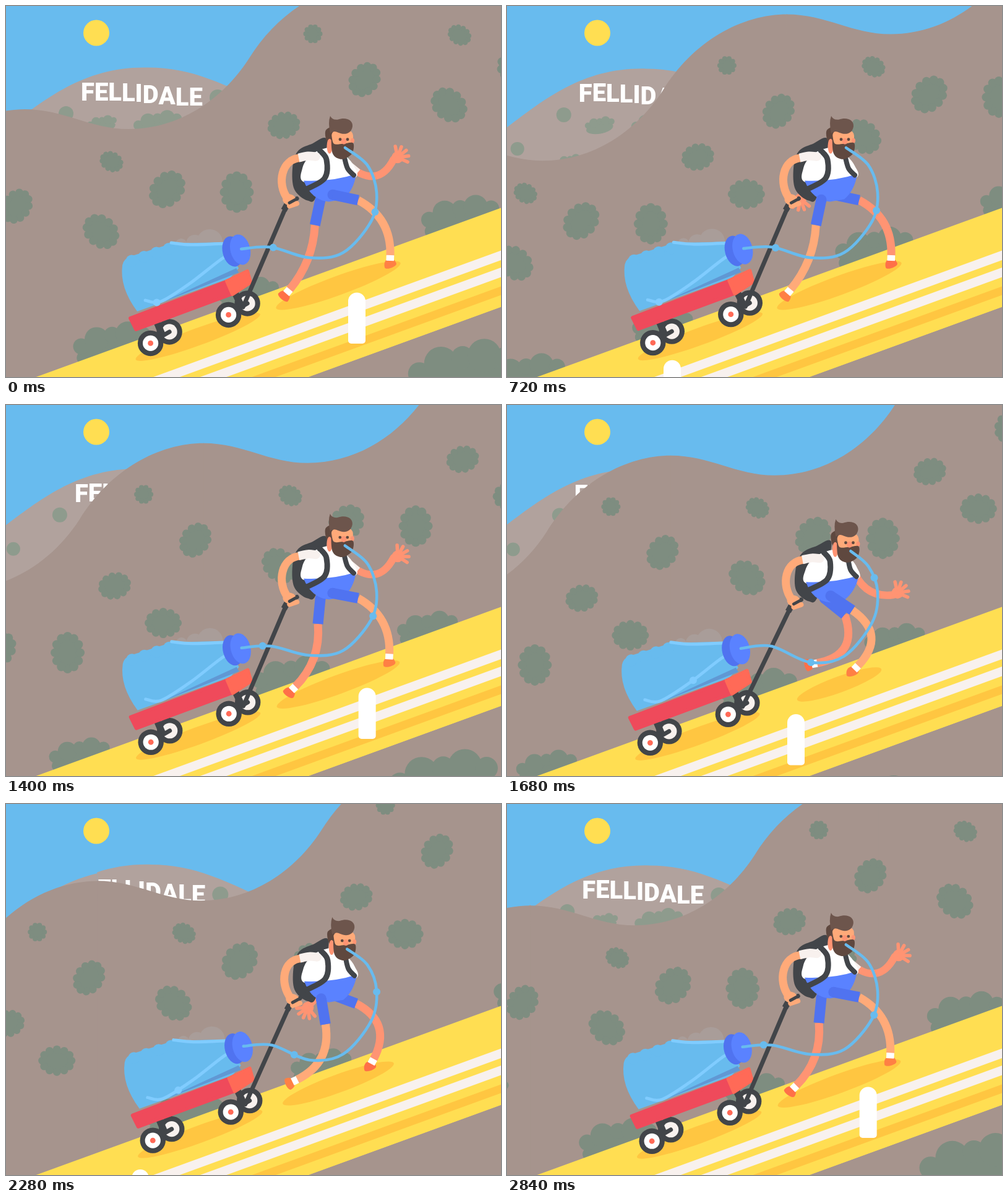
Recreate the animation shown at these times as an HTML page with a canvas. Size 800 px wide and 600 px high, loop 2.88 s.

```html
<!DOCTYPE html>
<html lang="en">
<head>
<meta charset="utf-8">
<title>Uphill hike</title>
<style>
html, body { margin: 0; width: 100%; height: 100%; overflow: hidden; background: #a6948d; }
canvas { display: block; }
</style>
</head>
<body>
<canvas id="stage" width="800" height="600"></canvas>
<script>
const c = document.getElementById('stage').getContext('2d');
const LOOP = 2880, CYCLE = 1440, STEP = 720, FRAME = 40;
const TAN = Math.tan(Math.PI / 9), TAU = Math.PI * 2, DEG = Math.PI / 180;
const HILL = 562.5, ROAD = 600, FAR = 20.8;

const col = {
  sky: '#68bbee', sun: '#ffde52', hill: '#a6948d', far: '#b1a29d', bush: '#7e8d80', farBush: '#8e9b8d',
  shade: '#ffc641', line: '#f8f1ee', dark: '#424549', red: '#ef4a5b', coral: '#ff6a57',
  blue: '#5a82ff', navy: '#5073f0', pale: '#80ccff', skin: '#ffaa79', skin2: '#ff9473',
  hair: '#6d554c', beard: '#5f483f'
};

const mix = (a, b, u) => a + (b - a) * u;
const ease = u => u * u * (3 - 2 * u);
const clamp = u => Math.max(0, Math.min(1, u));
// Cosine wave that peaks at the given time.
const wave = (t, period, peak) => Math.cos((t - peak) / period * TAU);

function spline(pts, closed) {
  const n = pts.length, g = i => closed ? pts[(i + n) % n] : pts[Math.max(0, Math.min(n - 1, i))];
  c.moveTo(...pts[0]);
  for (let i = 0; i < (closed ? n : n - 1); i++) {
    const [p, a, b, q] = [g(i - 1), g(i), g(i + 1), g(i + 2)];
    c.bezierCurveTo(a[0] + (b[0] - p[0]) / 6, a[1] + (b[1] - p[1]) / 6,
      b[0] - (q[0] - a[0]) / 6, b[1] - (q[1] - a[1]) / 6, ...b);
  }
}
function paint(fill) { c.fillStyle = fill; c.fill(); }
function blob(pts, fill) { c.beginPath(); spline(pts, true); paint(fill); }
function poly(pts, fill) { c.beginPath(); pts.forEach(p => c.lineTo(...p)); c.closePath(); paint(fill); }
function ink(color, width, cap = 'round') {
  c.strokeStyle = color; c.lineWidth = width; c.lineCap = cap; c.lineJoin = 'round'; c.stroke();
}
function curve(pts, color, width, cap) { c.beginPath(); spline(pts); ink(color, width, cap); }
function seg(x1, y1, x2, y2, color, width, cap) {
  c.beginPath(); c.moveTo(x1, y1); c.lineTo(x2, y2); ink(color, width, cap);
}
function oval(x, y, rx, ry, rot, fill) { c.beginPath(); c.ellipse(x, y, rx, ry, rot, 0, TAU); paint(fill); }
function disc(x, y, r, fill) { oval(x, y, r, r, 0, fill); }
function shifted(x, y, draw) { c.save(); c.translate(x, y); draw(); c.restore(); }
function uphill(m, draw) { shifted(m, -m * TAN, draw); }

// ---- landscape ----
function shrub(x, y, rx, rot) {
  const round = rx < 18, ry = round ? rx : rx * .82, n = round ? 10 : 12, r = ry * .26;
  c.save(); c.translate(x, y); c.rotate(rot);
  oval(0, 0, rx - r * .7, ry - r * .7, 0, col.bush);
  for (let i = 0; i < n; i++) {
    const a = i / n * TAU;
    disc((rx - r) * Math.cos(a), (ry - r) * Math.sin(a), r, col.bush);
  }
  c.restore();
}

// A rounded row of leaves that leans with the slope.
function hedge(x, y, w, fill) {
  oval(x, y + w * .12, w * .58, w * .24, -.18, fill);
  for (let i = 0; i < 5; i++) {
    const dx = w * (i / 4 - .5), lift = w * .17 * Math.sin(Math.PI * (i + .8) / 5.6);
    disc(x + dx, y - lift - dx * TAN / 2, w * (i % 2 ? .195 : .13), fill);
  }
}

const SIGN = 'FELLIDALE';

function farHill(m) {
  uphill(m, () => {
    c.beginPath(); c.moveTo(-60, 240);
    c.bezierCurveTo(30, 186, 98, 96, 230, 99.5);
    c.bezierCurveTo(300, 99.5, 350, 125, 440, 168);
    c.lineTo(440, 420); c.lineTo(-60, 420); paint(col.far);
    disc(97, 174, 12, col.farBush);
    disc(342, 148, 13, col.farBush);
    disc(22, 229, 11, col.farBush);
    hedge(155, 191, 38, col.farBush);
    hedge(245, 192, 62, col.farBush);
    hedge(107, 252, 38, col.farBush);
    c.fillStyle = '#fff'; c.font = '900 40px Roboto, sans-serif';
    let x = 121;
    [...SIGN].forEach((ch, i) => {
      c.fillText(ch, x, 157 - 4.5 * Math.cos((i - 1.3) / 7 * Math.PI));
      x += c.measureText(ch).width;
    });
  });
}

function hillSpan() {
  c.beginPath(); c.moveTo(30, 167);
  c.bezierCurveTo(95, 167, 135, 199, 198, 199);
  c.bezierCurveTo(280, 199, 350, 151, 392, 86);
  c.bezierCurveTo(442, 5, 520, -37.7, 593.5, -37.7);
  c.lineTo(593.5, 900); c.lineTo(30, 900); paint(col.hill);
}
function hillPlants() {
  shrub(496, 45, 15.5, 0);
  shrub(733, 47, 20, .5);
  shrub(579.5, 119, 30, -.95);
  shrub(716, 160, 32, .7);
  shrub(449, 193, 27, -.25);
  shrub(260.5, 296.5, 33, -.85);
  shrub(373, 301, 33.5, Math.PI / 2);
  shrub(527.5, 253, 30, 0);
  hedge(734, 344, 100, col.bush);
  hedge(392, 468, 78, col.bush);
}

function landscape(t) {
  c.fillStyle = col.sky; c.fillRect(0, 0, 800, 600);
  disc(146, 43.5, 21, col.sun);

  const d = t / LOOP, crest = 30 + HILL * (1 - d);
  // The distant hill restarts behind the passing crest.
  for (const side of [0, 1]) {
    c.save(); c.beginPath(); c.rect(side ? crest : 0, 0, side ? 800 : crest, 600); c.clip();
    farHill(FAR * (side - d)); c.restore();
  }
  for (const part of [hillSpan, hillPlants])
    for (let k = -1; k < 3; k++) uphill((k - d) * HILL, part);
}

function stripe(top, bottom, fill) {
  const fall = 800 * TAN;
  poly([[0, top + fall], [800, top], [800, bottom], [0, bottom + fall]], fill);
}

function road(t) {
  stripe(326.5, 487, col.sun);
  stripe(487, 1000, col.hill);
  stripe(395.5, 411, col.line);
  stripe(423, 438.5, col.line);
  stripe(453.5, 467.5, col.shade);
  for (let k = 0; k < 2; k++) uphill((2 * k - t / CYCLE) * ROAD, () => {
    hedge(738, 592, 140, col.bush);
    hedge(1290, 398, 140, col.bush);
  });
}

function post(t) {
  for (let k = 0; k < 3; k++) uphill((k - t / CYCLE) * ROAD, () => {
    c.beginPath(); c.roundRect(553, 463.5, 28, 82.5, [14, 14, 5, 5]); paint('#fff');
  });
}

// ---- wagon ----
function wheel(x, y, near) {
  disc(x, y, 20.7, col.dark);
  disc(x, y, 12.6, near ? '#fff' : col.line);
  if (near) disc(x, y, 4.4, col.coral);
  else seg(x, y, x - 14, y + 8, col.dark, 7);
}

const innerTube = [[225, 476], [250, 478], [298, 448], [350, 408], [380, 393]];

function wagon() {
  oval(310, 535, 107, 14, -.35, col.shade);
  for (let i = 0; i < 3; i++) disc(283 + i * 22, 385 - i, 9 + i * 5, '#a99d99');
  disc(329, 382, 21, '#a99d99');
  wheel(264, 527); wheel(390, 481);
  seg(244, 512, 252, 531, col.dark, 11, 'butt');
  seg(370, 464, 381, 487, col.dark, 11, 'butt');

  c.beginPath();
  c.moveTo(212, 494); c.quadraticCurveTo(183, 455, 188, 419);
  c.quadraticCurveTo(190, 408, 204, 404); c.lineTo(268, 384); c.lineTo(352, 382);
  c.lineTo(376, 424); c.lineTo(362, 440); c.closePath();
  paint(col.sky);
  for (let i = 0; i < 4; i++) disc(203 + i * 20, 412 - i * 6.5, 9.5, col.sky);
  poly([[250, 480], [372, 424], [376, 431]], '#6098d4');
  curve([[267, 383], [300, 386], [356, 384]], col.pale, 5);
  curve(innerTube, col.pale, 5);
  oval(366, 397, 16, 25, -.25, col.navy);
  oval(378.5, 394, 16, 25, -.25, col.blue);

  const box = (pts, fill) => { poly(pts, fill); ink(fill, 6); };
  box([[201, 505], [356, 446], [364, 466], [210, 523]], col.red);
  box([[357, 445], [390, 429], [395, 447], [366, 466]], col.coral);
  wheel(233.5, 545.5, true); wheel(359.5, 499.5, true);
}

// ---- walker ----
function pose(t) {
  return {
    hx: 4.2 - 4.4 * wave(t, STEP, -35),
    hy: 2.4 + 5.5 * wave(t, STEP, 215),
    by: -1 + 6 * wave(t, STEP, 150),
    shadow: 84 + 23 * wave(t, STEP, 0)
  };
}

function leg(t, by, skin, shoe) {
  const p = (t % CYCLE) / STEP, planted = p < 1, u = planted ? p : p - 1;
  const swing = planted ? 1 - u : ease(u);
  const ax = mix(458, 621, swing);
  const ay = mix(459, 404, swing) - (planted ? 0 : 36 * Math.sin(u * Math.PI) ** 2);
  const thigh = DEG * (planted ? 12 + 90 * u ** 1.3 : mix(102, 11, ease(clamp(u * 1.9))));
  const sway = wave(t, CYCLE, 0);
  const hx = 518 + 10 * sway, hy = 309 - 4 * sway + by * .5;
  const kx = hx + 42 * Math.cos(thigh), ky = hy + 42 * Math.sin(thigh);

  // The shin keeps its length, so it bows more as knee and ankle come closer.
  const dx = ax - kx, dy = ay - ky, dist = Math.hypot(dx, dy);
  const bow = Math.max(6, 10 + (118 - dist) * 1.6) / dist;
  const cx = (kx + ax) / 2 + dy * bow, cy = (ky + ay) / 2 - dx * bow;
  const shin = Math.atan2(ay - cy, ax - cx), ux = Math.cos(shin), uy = Math.sin(shin);
  const sole = mix(-.35, shin - Math.PI / 2, planted ? u ** 3 : 1 - u ** 3);

  c.save(); c.translate(ax + ux * 13, ay + uy * 13); c.rotate(sole);
  c.beginPath(); c.moveTo(-10, 3);
  c.bezierCurveTo(-9, -13, 10, -12, 10, 3);
  c.bezierCurveTo(9, 8, -9, 8, -10, 3);
  paint(shoe); c.restore();
  c.beginPath(); c.moveTo(kx, ky); c.quadraticCurveTo(cx, cy, ax, ay); ink(skin, 13, 'butt');
  seg(ax - ux, ay - uy, ax + ux * 8, ay + uy * 8, '#fff', 12.5, 'butt');
  disc(hx, hy, 8.5, col.navy);
  seg(hx, hy, kx, ky, col.navy, 17, 'butt');
}

function farArm(t, T) {
  const sway = wave(t, CYCLE, 0), side = wave(t, CYCLE, CYCLE / 4);
  const swing = 68 - 78 * sway, a = swing * DEG, reach = 88 - 8 * sway;
  const [sx, sy] = T(554, 258);
  const x = sx + reach * Math.cos(a), y = sy + reach * Math.sin(a);
  const palm = (swing * .9 - 18 - 42 * side) * DEG, bend = 24 + 22 * sway;
  const ex = (sx + x) / 2 - bend * Math.sin(a), ey = (sy + y) / 2 + bend * Math.cos(a);
  c.beginPath(); c.moveTo(sx, sy);
  c.quadraticCurveTo(ex, ey, x - Math.cos(palm) * 7, y - Math.sin(palm) * 7); ink(col.skin2, 12);
  disc(x, y, 9.5, col.skin2);
  for (let i = 0; i < 5; i++) {
    const f = palm - 1.3 + i * .55;
    seg(x, y, x + Math.cos(f) * 18, y + Math.sin(f) * 18, col.skin2, 5.5);
  }
  const toElbow = Math.atan2(ey - sy, ex - sx);
  seg(sx, sy, sx + 18 * Math.cos(toElbow), sy + 18 * Math.sin(toElbow), col.line, 14, 'butt');
}

function head() {
  blob([[517, 214], [517, 200], [530, 196], [531, 220], [522, 222]], col.beard);
  c.beginPath(); c.roundRect(526, 200, 35, 40, 9); paint(col.skin);
  oval(560, 217, 3, 4, 0, col.skin2);
  oval(523, 226, 4.5, 12, 0, col.skin2);
  blob([[526, 208], [530, 222], [545, 222], [561, 221], [559, 238], [543, 247], [528, 238]], col.beard);
  oval(546, 218, 4.5, 5, 0, col.skin2);
  for (const x of [540, 552]) disc(x, 215, 2.4, col.beard);
  c.beginPath(); c.moveTo(524, 177);
  c.quadraticCurveTo(527, 184, 536, 183);
  c.bezierCurveTo(550, 178, 561, 184, 560, 194);
  c.bezierCurveTo(558, 207, 546, 208, 537, 204);
  c.quadraticCurveTo(530, 200, 524, 205);
  c.quadraticCurveTo(520, 188, 524, 177);
  paint(col.hair);
}

function walker(t, wx, wy, { hx, hy, by, shadow }) {
  const gx = hx * .9 + wx * .6, gy = hy * .5;
  // Bends the torso between the hips and the head.
  const T = (x, y) => {
    const u = clamp((316 - y) / 90);
    return [x + u * hx * .75, y + mix(by, hy * .75, u)];
  };
  const M = pts => pts.map(p => T(...p));

  oval(537, 452, shadow, shadow * .07 + 8, -.35, col.shade);
  farArm(t, T);
  leg(t + STEP, by, col.skin2, '#ff7048');

  blob(M([[519, 218], [493, 223], [471, 235], [463, 262], [466, 296], [487, 314], [502, 305]]), col.dark);
  blob(M([[508, 232], [528, 229], [550, 243], [562, 258], [566, 276], [530, 288], [481, 284], [479, 262], [490, 243]]), '#fff');
  const [left, right, side, hem, foot] = M([[481, 282], [566, 271], [562, 298], [522, 316], [494, 314]]);
  c.beginPath(); c.moveTo(...left);
  c.quadraticCurveTo(...T(528, 284), ...right);
  c.quadraticCurveTo(...side, ...T(545, 312));
  c.lineTo(...hem); c.quadraticCurveTo(...foot, ...left);
  paint(col.blue);
  curve(M([[507, 233], [518, 248], [515, 278], [485, 296]]), col.dark, 9);
  curve(M([[547, 245], [552, 262], [562, 273]]), col.dark, 8);

  leg(t, by, col.skin, '#ff8044');
  shifted(hx, hy, head);

  const px = 454 + gx, py = 321 + gy;
  seg(383 + wx, 487 + wy, px, py, col.dark, 7);
  seg(px - 5, py + 9, px, py, col.dark, 10, 'butt');
  seg(px, py, px + 16, py - 10, col.dark, 7);
  const [sx, sy] = T(476, 245);
  c.beginPath(); c.moveTo(sx, sy);
  c.bezierCurveTo(sx - 31, sy + 2, px - 17, py - 34, px + 1, py - 10);
  ink(col.skin, 13);
  curve(M([[501, 243], [488, 242], [473, 245]]), col.line, 14, 'butt');
  disc(...T(501, 243), 7, col.line);
  oval(px + 4, py - 8, 11, 9, .2, col.skin);
  seg(px + 4, py + 2, px + 16, py - 2, col.skin, 8);
  seg(px + 4, py - 3, px + 15, py - 9, col.dark, 5);
}

// ---- drinking tube ----
function bead(pts, s, fill) {
  for (let i = 1; i < pts.length; i++) {
    const [a, b] = [pts[i - 1], pts[i]], len = Math.hypot(b[0] - a[0], b[1] - a[1]);
    if (s <= len) return disc(mix(a[0], b[0], s / len), mix(a[1], b[1], s / len), 6, fill);
    s -= len;
  }
}
// Fine points along the same curve that spline() draws.
function sample(pts) {
  const out = [], n = pts.length;
  for (let i = 0; i < n - 1; i++) {
    const [p, a, b, q] = [pts[Math.max(0, i - 1)], pts[i], pts[i + 1], pts[Math.min(n - 1, i + 2)]];
    for (let u = 0; u < 1; u += 1 / 16) out.push([0, 1].map(k => {
      const m = a[k] + (b[k] - p[k]) / 6, w = b[k] - (q[k] - a[k]) / 6, v = 1 - u;
      return v * v * v * a[k] + 3 * u * v * (v * m + u * w) + u * u * u * b[k];
    }));
  }
  return [...out, pts[n - 1]];
}
function tube(t, wx, wy, { hx, hy }) {
  const sag = hy * 1.3;
  const outer = [[380 + wx, 393 + wy], [428 + wx / 2, 390], [490, 406 + sag], [545, 398 + sag * .8],
    [590, 348 + sag * .4], [599, 302], [584, 257 + hy * .5], [548 + hx, 228.5 + hy]];
  curve(outer, col.sky, 4.6);
  const pts = sample(outer), u = t % STEP, first = 19 + u * .29, neck = 182;
  if (first < neck) bead(sample(innerTube.map(([x, y]) => [x + wx, y + wy])), first, col.pale);
  else bead(pts, first - neck, col.sky);
  for (const s of [52, 254]) bead(pts, s + u * .28, col.sky);
}

function draw(now) {
  const t = Math.floor((now % LOOP) / FRAME) * FRAME, body = pose(t);
  const wx = 1.2 - 3.4 * wave(t, CYCLE, 285), wy = -wx * TAN;
  landscape(t);
  road(t);
  shifted(wx, wy, wagon);
  walker(t, wx, wy, body);
  tube(t, wx, wy, body);
  post(t);
}

const start = performance.now();
function tick() {
  draw(performance.now() - start);
  requestAnimationFrame(tick);
}
tick();
</script>
</body>
</html>
```
